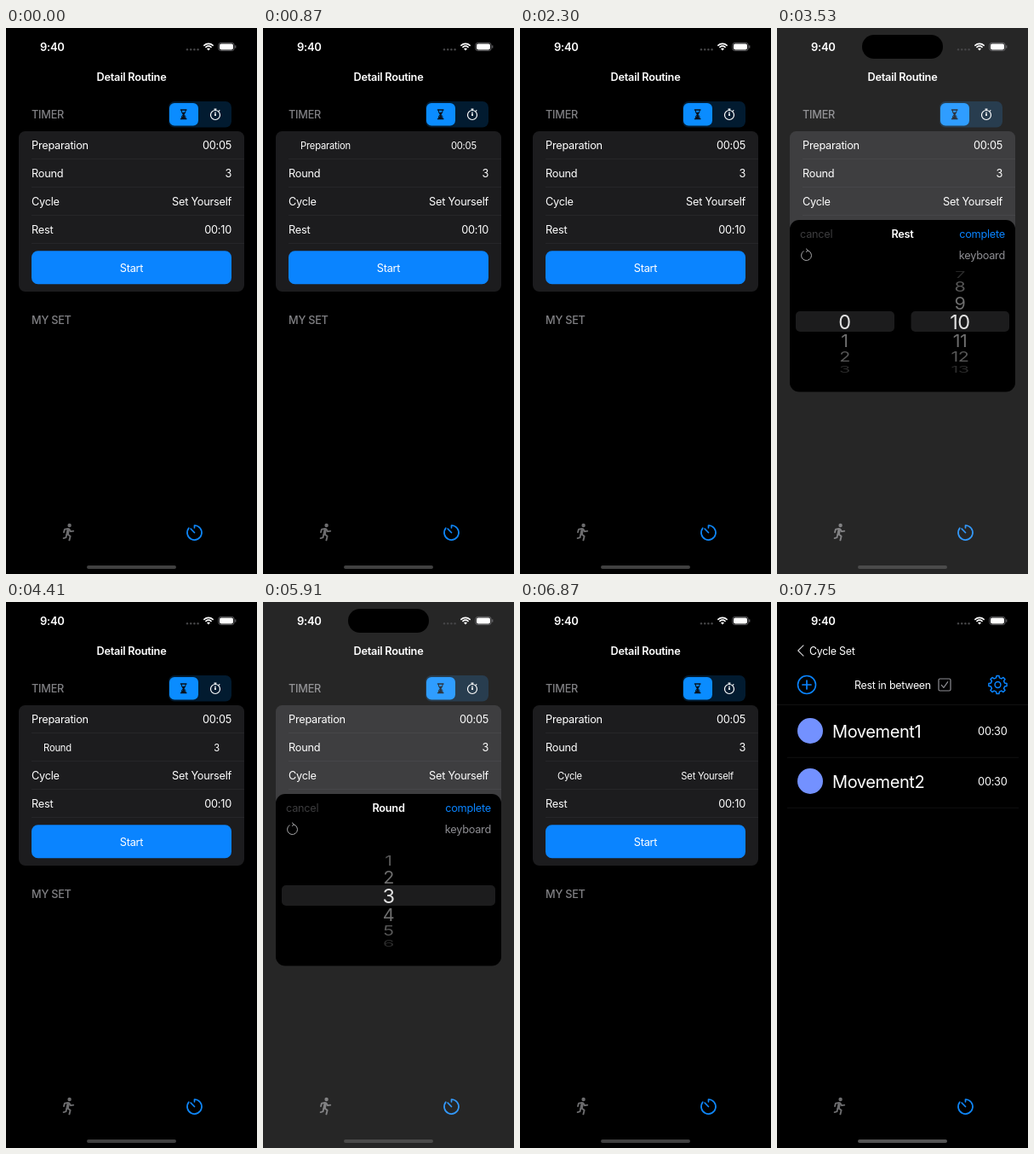
Recreate the animation shown at these times as an HTML page. Size 295 by 640 pixels, loop 9190 ms.

```html
<!DOCTYPE html>
<html lang="en">
<head>
<meta charset="utf-8">
<title>Interval timer</title>
<style>
  html, body { margin: 0; width: 100%; height: 100%; overflow: hidden; background: #000; }
  svg { display: block; width: 100%; height: 100%; }
  text { font-family: Inter, Roboto, sans-serif; letter-spacing: -.02em; white-space: pre; }
</style>
</head>
<body>
<svg id="stage" viewBox="0 0 295 640"></svg>
<script>
const LOOP = 9190, W = 295, MID = W / 2;
const BLUE = '#0a84ff', GRAY = '#808084';
const stage = document.getElementById('stage');

function el(parent, tag, attrs = {}, content) {
  const node = document.createElementNS('http://www.w3.org/2000/svg', tag);
  for (const k in attrs) node.setAttribute(k, attrs[k]);
  if (content !== undefined) node.textContent = content;
  parent.appendChild(node);
  return node;
}
const group = (p, attrs) => el(p, 'g', attrs);
const box = (p, x, y, width, height, rx, fill, more) =>
  el(p, 'rect', { x, y, width, height, rx, fill, ...more });
const dot = (p, cx, cy, r, fill) => el(p, 'circle', { cx, cy, r, fill });
const ring = (p, cx, cy, r, stroke, width) =>
  el(p, 'circle', { cx, cy, r, fill: 'none', stroke, 'stroke-width': width });
const line = (p, d, stroke, width) => el(p, 'path', {
  d, fill: 'none', stroke, 'stroke-width': width,
  'stroke-linecap': 'round', 'stroke-linejoin': 'round'
});
const rule = (p, x1, x2, y, stroke) => el(p, 'path', { d: `M${x1} ${y}H${x2}`, stroke, 'stroke-width': .7 });

// Text centred vertically on y
function label(p, str, x, y, { size = 12.75, fill = '#fff', weight = 400, anchor = 'start', ...more } = {}) {
  return el(p, 'text', {
    x, y: y + size * .364, 'font-size': size, fill,
    'font-weight': weight, 'text-anchor': anchor, ...more
  }, str);
}

// Arc path, angles in degrees clockwise from the top
function arc(cx, cy, r, from, to) {
  const at = a => {
    a = a * Math.PI / 180;
    return `${(cx + r * Math.sin(a)).toFixed(2)} ${(cy - r * Math.cos(a)).toFixed(2)}`;
  };
  return `M${at(from)}A${r} ${r} 0 ${to - from > 180 ? 1 : 0} 1 ${at(to)}`;
}

function gearPath(cx, cy, teeth, inner, outer) {
  let d = '';
  const step = 2 * Math.PI / teeth;
  for (let i = 0; i < teeth; i++) {
    [[-.3, inner], [-.17, outer], [.17, outer], [.3, inner]].forEach(([f, r]) => {
      const a = (i + f) * step;
      d += `${d ? 'L' : 'M'}${(cx + r * Math.sin(a)).toFixed(2)} ${(cy - r * Math.cos(a)).toFixed(2)}`;
    });
  }
  return d + 'Z';
}

// Routine screen
const routine = group(stage);
label(routine, 'TIMER', 30, 101.5, { fill: GRAY, weight: 500 });
box(routine, 191, 86, 74, 30.5, 7, '#021b30');
box(routine, 192, 88, 34, 26.5, 6, '#0a8cff');
const GLASS = '#08111c';
line(routine, 'M205.4 96h6.6M205.4 106.6h6.6', GLASS, 1.3);
line(routine, 'M206.2 96.4q0 3 2 4.9q-2 1.9-2 4.9h5q0-3-2-4.9q2-1.9 2-4.9', GLASS, 1);
el(routine, 'path', { d: 'M206.8 98.8h3.8l-1.4 2.5l1.6 4.8h-4.2l1.6-4.8z', fill: GLASS });
ring(routine, 246, 102, 5.5, '#fff', 1.2);
line(routine, 'M244.9 95h2.2M246 95v1.4M246 102v-3.2M250.3 97.2l.6-.6', '#fff', 1.2);
dot(routine, 246, 102, 1.1, '#fff');

box(routine, 15, 121, 265, 188, 7.5, '#1c1c1e');
const rows = [['Preparation', '00:05'], ['Round', '3'], ['Cycle', 'Set Yourself'], ['Rest', '00:10']]
  .map(([name, value], i) => {
    const y = 137.5 + 33 * i, row = group(routine);
    label(row, name, 30, y);
    label(row, value, 265, y, { anchor: 'end' });
    rule(routine, 30, 280, y + 16, '#2b2b2e');
    return { row, y };
  });
box(routine, 30, 261.2, 235, 39, 7.5, BLUE);
label(routine, 'Start', MID, 281, { anchor: 'middle' });
label(routine, 'MY SET', 30, 342.5, { fill: GRAY, weight: 500 });

// Cycle screen
const cycle = group(stage);
box(cycle, 0, 75, W, 490, 0, '#000');
ring(cycle, 35, 97, 10.5, BLUE, 1.6);
line(cycle, 'M30 97h10M35 92v10', BLUE, 1.7);
label(cycle, 'Rest in between', 91, 97, { size: 12.4 });
box(cycle, 190, 90, 14, 14, 1.5, 'none', { stroke: '#8e8e93', 'stroke-width': 1.2 });
line(cycle, 'M193.3 97.3l2.6 3l4.8-6.6', '#8e8e93', 1.2);
line(cycle, gearPath(259.5, 97, 8, 8.3, 10.7), BLUE, 1.5);
ring(cycle, 259.5, 97, 3.4, BLUE, 1.5);
rule(cycle, 0, W, 120.5, '#171719');
['Movement1', 'Movement2'].forEach((name, i) => {
  const y = 151 + 59 * i;
  dot(cycle, 39, y, 15, '#7391ff');
  label(cycle, name, 65, y + .5, { size: 20 });
  label(cycle, '00:30', 270.5, y, { anchor: 'end' });
  rule(cycle, 12, 284, y + 31.3, '#171719');
});

// Navigation and tab bar
const title = group(stage);
label(title, 'Detail Routine', MID, 57, { weight: 600, anchor: 'middle' });
const back = group(stage);
line(back, 'M31 50.8l-6.2 6.2l6.2 6.2', '#d0d0d2', 1.1);
const backText = label(back, 'Cycle Set', 38, 57, { size: 12.4 });

const RUN = '#6c6c6e';
dot(stage, 74.6, 583, 2.2, RUN);
line(stage, 'M73.2 588l-.9 4.8', RUN, 3.4);
line(stage, 'M72.6 587l-3.6.6l-1 3.4M74.2 587.4l1.8 2.7l3.2-.5M72.6 593.4l3 2.4l-1.2 4.6M71.2 593.6l-.6 3.6l-3 .9', RUN, 1.9);
line(stage, arc(221.5, 591.5, 8.5, 0, 308) + 'M221.5 583v2.8M221.5 591.5l-4.4-4.5', '#0f86f8', 1.7);

// Picker popup, over a light veil
const popup = group(stage);
box(popup, 0, 0, W, 640, 0, '#fff', { 'fill-opacity': .15 });
box(popup, 15, 225, 265, 201.5, 11, '#000');
label(popup, 'cancel', 27, 241.5, { fill: '#3c3c3e' });
const popTitle = label(popup, '', MID, 241.5, { weight: 600, anchor: 'middle' });
label(popup, 'complete', 268, 241.5, { fill: BLUE, anchor: 'end' });
line(popup, arc(34.5, 266.5, 6, 15, 325) + 'M34.3 258.9l2 1.7l-2 1.9', '#a8a8aa', 1);
label(popup, 'keyboard', 268, 266, { fill: '#8e8e93', anchor: 'end' });

function wheel(p, cx, x, width, value, min) {
  box(p, x, 332, width, 24, 5, '#1c1c1d');
  for (let i = -3; i <= 3; i++) {
    if (value + i < min) continue;
    const a = i * Math.PI / 9, far = Math.abs(i);
    const item = group(p, { transform: `translate(${cx} ${344.3 + 64 * Math.sin(a)}) scale(1 ${Math.cos(a)})` });
    label(item, value + i, 0, 0, {
      size: far ? 21.5 : 23.5, anchor: 'middle',
      'fill-opacity': [.87, .43, .34, .17][far]
    });
  }
}
const wheels = {
  Preparation: g => wheel(g, MID, 22, 251, 5, 0),
  Rest: g => {
    wheel(g, 79.5, 22, 116, 0, 0);
    wheel(g, 215, 157.5, 115.5, 10, 0);
  },
  Round: g => wheel(g, MID, 22, 251, 3, 1)
};
for (const name in wheels) {
  const g = group(popup);
  wheels[name](g);
  wheels[name] = g;
}

// System chrome
box(stage, 100, 8, 95, 28, 14, '#000');
label(stage, '9:40', 40, 22, { weight: 600, size: 13 });
for (let i = 0; i < 4; i++) dot(stage, 213 + 4.2 * i, 25.2, 1.2, '#454547');
line(stage, arc(238, 26, 7.6, -42, 42) + arc(238, 26, 4.7, -40, 40), '#fff', 1.7);
el(stage, 'path', { d: 'M238 26.4l-2-2.2q2-1.6 4 0z', fill: '#fff' });
box(stage, 249.8, 17.4, 18.4, 9.2, 2.8, 'none', { stroke: '#77777a', 'stroke-width': .8 });
box(stage, 251, 18.6, 16, 6.8, 1.8, '#fff');
line(stage, 'M269.8 20.8v2.4', '#77777a', 1);
const home = box(stage, 95, 630, 105, 4, 2, '#fff');

// Timeline, in ms
const presses = [[870, 1010, 0], [2670, 2790, 3], [4410, 4530, 1], [6870, 7040, 2]];
const popups = [
  { name: 'Preparation', open: 1010, close: 1740, end: 2300, steps: 6 },
  { name: 'Rest', open: 2790, close: 3530, end: 3970, steps: 5 },
  { name: 'Round', open: 4530, close: 5910, end: 6220, steps: 4 }
];
const push = { start: 7040, end: 7480, steps: 5 };

// Index of the discrete step reached at time t
const stepAt = (t, start, end, steps) =>
  Math.max(0, Math.min(steps - 1, Math.floor((t - start) / (end - start) * (steps - 1) + .05)));
const smooth = x => x * x * (3 - 2 * x);

function draw(t) {
  const pressed = presses.find(([a, b]) => t >= a && t < b);
  rows.forEach(({ row, y }, i) => {
    const s = pressed && pressed[2] === i ? .88 : 1;
    row.setAttribute('transform', `translate(${MID} ${y}) scale(${s}) translate(${-MID} ${-y})`);
  });

  const pop = popups.find(p => t >= p.open && t < p.end);
  let alpha = 0;
  if (pop) {
    alpha = 1 - smooth(stepAt(t, pop.close, pop.end, pop.steps) / (pop.steps - 1));
    popTitle.textContent = pop.name;
    for (const name in wheels) wheels[name].setAttribute('display', name === pop.name ? 'inline' : 'none');
  }
  popup.setAttribute('opacity', alpha);
  popup.setAttribute('display', alpha ? 'inline' : 'none');

  let p = 0;
  if (t >= push.start) {
    const x = (stepAt(t, push.start, push.end, push.steps) + .3) / (push.steps - .7);
    p = 1 - (1 - x) ** 3;
  }
  routine.setAttribute('transform', `translate(${-.3 * W * p} 0)`);
  cycle.setAttribute('transform', `translate(${W * (1 - p)} 0)`);
  cycle.setAttribute('display', p ? 'inline' : 'none');
  title.setAttribute('transform', `translate(${-90 * p} 0)`);
  title.setAttribute('opacity', Math.max(0, 1 - 1.5 * p));
  back.setAttribute('opacity', p);
  backText.setAttribute('transform', `translate(${100 * (1 - p)} 0)`);
  home.setAttribute('fill-opacity', .25 + .08 * p - .08 * alpha);
}

const origin = performance.now();
function tick() {
  draw((performance.now() - origin) % LOOP);
  requestAnimationFrame(tick);
}
tick();
</script>
</body>
</html>
```
